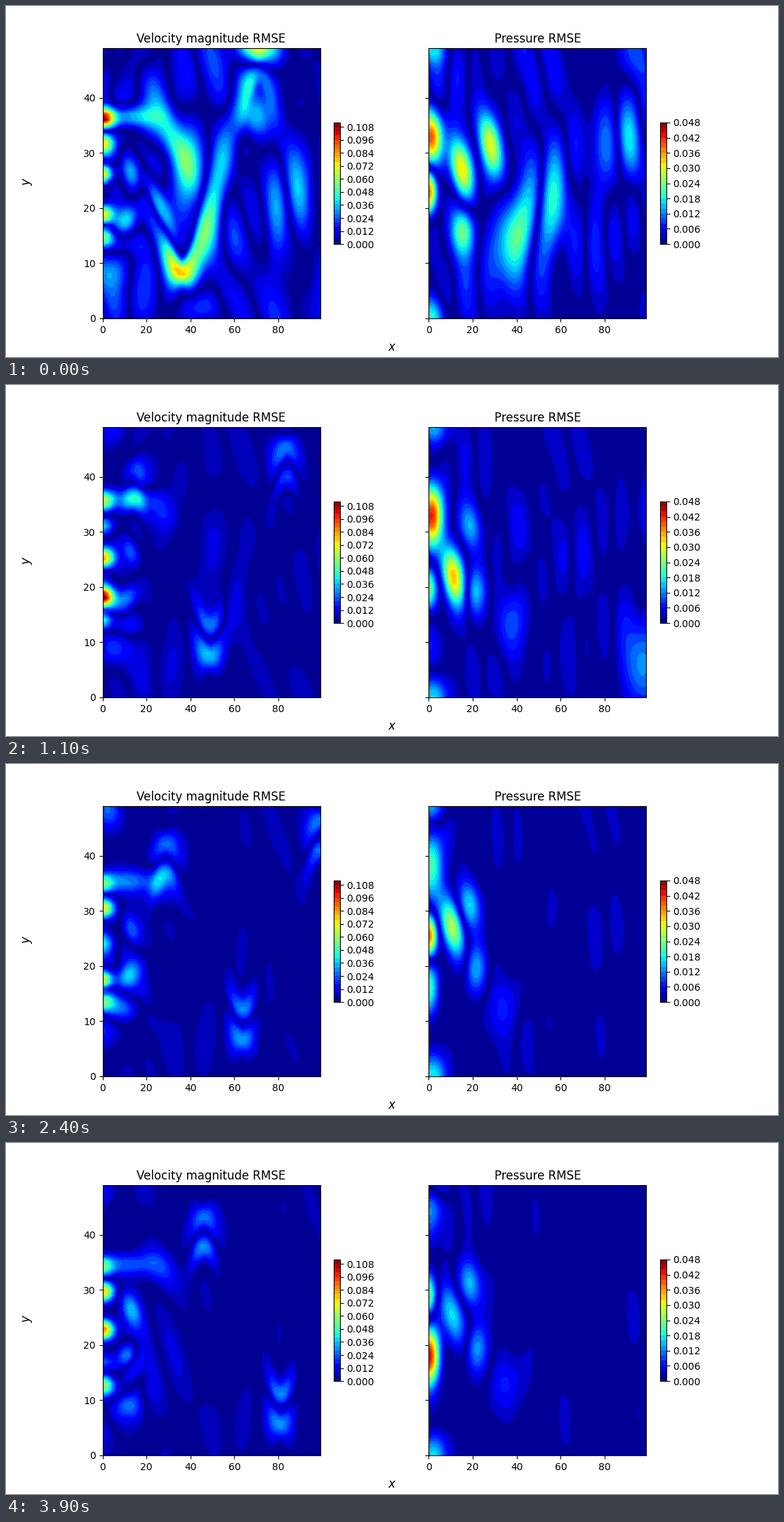
Animation, 1100 px wide and 500 px high, one loop 4 s. Source, as a matplotlib script:

```python
import numpy as np
import matplotlib.pyplot as plt
from matplotlib.animation import FuncAnimation

FRAMES, INTERVAL = 40, 100
DRIFT = 1.15        # downstream motion per frame, in grid cells
WAVELENGTH = 70     # of the meandering wake
MIDLINE = 25.5
X, Y = np.meshgrid(np.arange(100.0), np.arange(50.0))


def blob(x, y, width, height, peak, tilt=0):
    dx, dy = X - x, Y - y
    return peak * np.exp(-((dx - tilt * dy) / width) ** 2 - (dy / height) ** 2)


def pulse(frame, crest, period):
    return np.cos(2 * np.pi * (frame - crest) / period)


def startup(frame):
    return np.exp(-frame / 5)


def make_ripple(seed, kx_range, ky_max, count=12):
    rng = np.random.default_rng(seed)
    kx = rng.uniform(*kx_range, count)
    ky = rng.uniform(-ky_max, ky_max, count)
    phase = rng.uniform(0, 2 * np.pi, count)

    def ripple(frame):
        moved = X - DRIFT * frame
        waves = (np.sin(a * moved + b * Y + p) for a, b, p in zip(kx, ky, phase))
        return sum(waves) / np.sqrt(count / 2)

    return ripple


velocity_ripple = make_ripple(4, (.08, .32), .3)
pressure_ripple = make_ripple(9, (.15, .45), .22)


def wake_band(phase, amplitude, thickness):
    """Ribbon of even thickness along a travelling sine."""
    centre = MIDLINE - amplitude * np.cos(phase)
    slope = amplitude * np.sin(phase) * 2 * np.pi / WAVELENGTH
    return np.exp(-((Y - centre) / (thickness * np.hypot(1, 2.5 * slope))) ** 2)


def wake(frame):
    spin = startup(frame)
    phase = 2 * np.pi * (X - 36 - DRIFT * frame) / WAVELENGTH
    amplitude = 15 + .06 * X
    entry = np.clip((X - 2) / 15, 0, 1)
    steady = 30 * np.cos(phase) ** 4
    surge = 48 * spin * np.exp(-((X - 40 - DRIFT * frame) / 25) ** 2)
    outer = (steady + surge) * wake_band(phase, amplitude, 2.2)
    inner = steady * (1 - spin) * wake_band(phase, amplitude - 5.5, 2.2)
    return entry * (inner - outer)


def inlet_jets(frame):
    spin, sink = startup(frame), .05 * frame
    peaks = [
        (36.2, 48 + 50 * spin),
        (31.7, -68 - 24 * pulse(frame, 32, 44)),
        (26.3 - .04 * frame, 67 + 35 * pulse(frame, 6, 37)),
        (18.8, -65 - 40 * pulse(frame, 16, 46) - 45 * spin),
        (14.7, 52),
    ]
    total = sum(blob(0, y - sink, 5, 1.7, peak) for y, peak in peaks)
    total += blob(11, 36.6 - sink, 12, 2, 25 + 20 * spin)
    total += blob(26, 34, 7, 4, 16, -1)
    total += blob(13, 26.5, 4, 3, 28, -.6)
    total += blob(11, 18, 5, 2.5, -32, .9)
    total += blob(10, 13.5 - sink, 9, 2, 18)
    total += blob(3, 8.5, 9, 3, -16)
    return total + blob(3, 48, 7, 3, -15)


def velocity(frame):
    spin, shift = startup(frame), DRIFT * frame
    total = wake(frame) + inlet_jets(frame)
    surge = [(31, 34, 6, 10, 36, -1), (41, 28, 7, 8, 27), (71, 49.5, 13, 4, 60),
             (67, 36.5, 8, 3.5, -28), (25, 21, 4, 6, 62, -.9), (79, 18, 5, 10, 22),
             (89, 22, 5, 10, -24, -.4), (60, 13, 6, 6, 14), (45, 2, 9, 3, 20)]
    for x, *shape in surge:
        total += spin * blob(x + shift, *shape)
    noise = (1.5 + 4 * np.exp(-X / 45)) + 5 * spin
    return total + noise * velocity_ripple(frame)


def inlet_pressure(frame):
    """Lobes of alternating sign that climb along the inlet."""
    times = [0, 6, 11, 15, 24, 30, 39]
    upper = np.interp(frame, [0, 15, 24, 39], [40, 46, 23, 18])
    middle = np.interp(frame, times, [-42, -49, -25, -27, -44, -40, -25])
    middle_y = np.interp(frame, times, [23, 21.5, 19.8, 19, 25.5, 28, 29])
    lower = np.interp(frame, times, [0, 22, 6, 8, 20, 42, 42])
    lower_y = np.interp(frame, times, [10, 12, 9, 9, 16, 19, 18])
    upper_y = 33 + .48 * max(0, frame - 12)
    return (blob(1, upper_y, 5, 5 + .05 * frame, upper)
            + blob(0, middle_y, 3.8, 4, middle)
            + blob(0, lower_y, 4.5, 5, lower)
            + blob(2, 0, 6, 4, -18)
            + blob(2, 49, 7, 3, -13))


def pressure(frame):
    spin, shift = startup(frame), DRIFT * frame
    total = inlet_pressure(frame)
    total += blob(10.5 + 4 * spin, 25.5 + 3.5 * pulse(frame, 30, 36), 5, 5.5,
                  30 + 16 * pulse(frame, 6, 24), -.4)
    total += blob(18.5, 31, 5, 4.5, -17 * (1 - spin), -.2)
    total += blob(21.5 - 6 * spin, 19.5 - 3.5 * spin, 5, 4.5, -13 - 9 * spin)
    total += blob(35 + 5 * spin, 13 + 3 * spin, 8, 6 + 3 * spin, 6 + 19 * spin, .4)
    surge = [(28, 31.5, 5, 6, -25, -.5), (55, 19.5, 7, 9, -19),
             (77, 32, 6, 9, 13), (90, 32, 6, 8, -13, -.4), (92, 48, 8, 6, 7)]
    for x, *shape in surge:
        total += spin * blob(x + shift, *shape)
    outlet = np.exp(-((frame - 12) / 8) ** 2)
    total += outlet * (blob(98, 7, 8, 9, 14) + blob(98, 33, 6, 7, -8))
    noise = .9 + 2 * np.exp(-frame / 12) + np.exp(-X / 30)
    return total + noise * pressure_ripple(frame)


fig, axes = plt.subplots(1, 2, sharey=True, figsize=(11, 5), dpi=100)
fig.supxlabel("$x$")
fig.supylabel("$y$")

PANELS = [
    (axes[0], "Velocity magnitude RMSE", velocity, np.linspace(0, .112, 29)),
    (axes[1], "Pressure RMSE", pressure, np.linspace(0, .048, 25)),
]


def draw_panel(ax, field, levels, frame):
    values = np.minimum(np.abs(field(frame)) / 1000, levels[-1] * .999)
    return ax.contourf(X, Y, values, levels=levels, cmap="jet")


contours = []
for ax, title, field, levels in PANELS:
    ax.set_title(title)
    contours.append(draw_panel(ax, field, levels, 0))
    fig.colorbar(contours[-1], ax=ax, shrink=.45)


def update(frame):
    for i, (ax, _, field, levels) in enumerate(PANELS):
        contours[i].remove()
        contours[i] = draw_panel(ax, field, levels, frame)
    return contours


anim = FuncAnimation(fig, update, frames=FRAMES, interval=INTERVAL, repeat=True)
plt.show()
```
